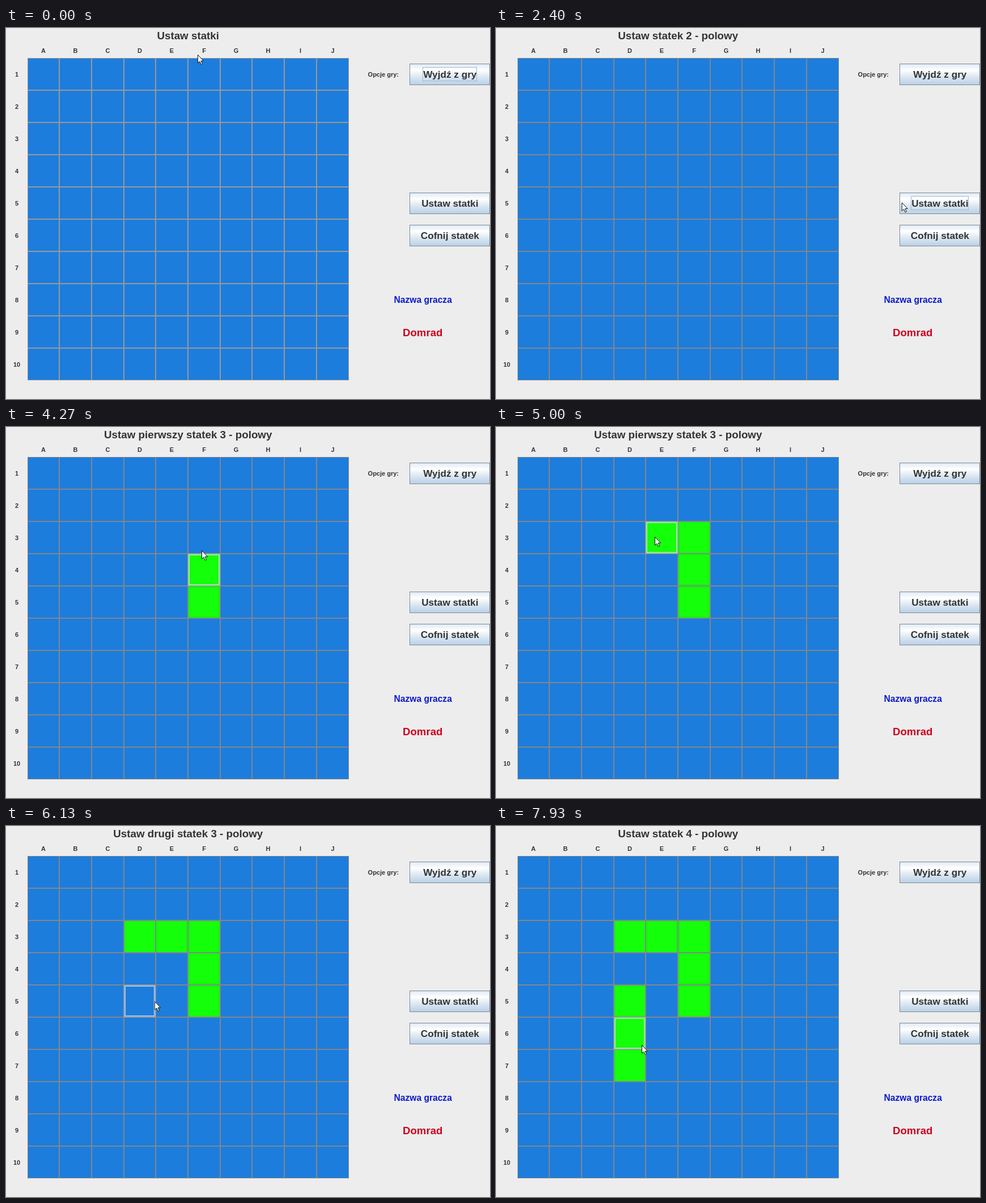
An HTML page with a canvas for the animation above (8000 ms loop, 854 by 656 pixels).

```html
<!DOCTYPE html>
<html lang="pl">
<head>
<meta charset="utf-8">
<title>Ustaw statki</title>
<style>
  html, body { margin: 0; width: 100%; height: 100%; overflow: hidden; background: #ededed; }
  canvas { display: block; }
</style>
</head>
<body>
<canvas id="stage" width="854" height="656"></canvas>
<script>
const ctx = document.getElementById('stage').getContext('2d');
const LOOP = 8000, FPS = 15, SHADE_TIME = 130;
const COLUMNS = 'ABCDEFGHIJ';
const INK = '#333', PRESSED = '#b8cfe5';
const edgeX = i => Math.round(37.8 + i * 56.67);
const edgeY = i => Math.round(53.4 + i * 56.92);

// Pointer stops: time and position of the tip
const stops = [
  [0, 338, 47], [870, 563, 33], [1530, 662, 176], [1800, 792, 300], [2130, 793, 308],
  [3130, 362, 310], [3400, 373, 303], [3900, 350, 248], [4530, 342, 200], [5000, 280, 194],
  [5400, 227, 207], [6130, 262, 310], [6870, 234, 375], [7270, 234, 412], [LOOP - 70, 257, 387]
];

// Mouse clicks: what is clicked, press and release time
const clicks = [
  ['place', 1800, 2130], ['F5', 3200, 3270], ['F4', 3670, 3870], ['F3', 4400, 4530],
  ['E3', 4800, 4870], ['D3', 5330, 5530], ['D5', 6000, 6400], ['D6', 6800, 7000],
  ['D7', 7130, 7470], ['D6', 7870, 7930]
];

function titleFor(started, fields) {
  if (!started) return 'Ustaw statki';
  if (fields < 2) return 'Ustaw statek 2 - polowy';
  if (fields < 5) return 'Ustaw pierwszy statek 3 - polowy';
  if (fields < 8) return 'Ustaw drugi statek 3 - polowy';
  return 'Ustaw statek 4 - polowy';
}

function stateAt(t) {
  const [focus, press, release] = clicks.filter(c => c[1] <= t).pop() || ['exit', -LOOP, -LOOP];
  const done = new Set(clicks.filter(c => c[2] <= t).map(c => c[0]));
  const started = done.delete('place');
  const pressed = t < Math.min(release, press + SHADE_TIME) ? focus : '';
  return { focus, pressed, done, started, title: titleFor(started, done.size) };
}

function pointerAt(t) {
  const next = stops.findIndex(s => s[0] > t);
  if (next < 0) return stops[stops.length - 1].slice(1);
  const [t0, x0, y0] = stops[next - 1], [t1, x1, y1] = stops[next];
  const k = (t - t0) / (t1 - t0), eased = k * k * (3 - 2 * k);
  return [x0 + (x1 - x0) * eased, y0 + (y1 - y0) * eased];
}

function rect(x, y, w, h, color) {
  ctx.fillStyle = color;
  ctx.fillRect(x, y, w, h);
}

// One-pixel frame just inside the given box
function frame(x, y, w, h, color) {
  ctx.strokeStyle = color;
  ctx.lineWidth = 1;
  ctx.strokeRect(x + 0.5, y + 0.5, w - 1, h - 1);
}

function text(str, x, baseline, size, color = INK) {
  ctx.font = `bold ${size}px "Liberation Sans", Arial, sans-serif`;
  ctx.textAlign = 'center';
  ctx.fillStyle = color;
  ctx.fillText(str, x, baseline);
}

function drawCell(col, row, state) {
  const name = COLUMNS[col] + (row + 1);
  const x = edgeX(col), y = edgeY(row);
  const w = edgeX(col + 1) - x, h = edgeY(row + 1) - y;
  const pressed = state.pressed === name;
  const color = pressed ? PRESSED : state.done.has(name) ? '#14ff0a' : '#1d7ddc';
  rect(x + 1, y + 1, w - 2, h - 2, color);
  if (state.focus === name && !pressed) {
    ['#b4b4b8', 'rgba(255,255,255,.3)', '#d0d0da']
      .forEach((ring, i) => frame(x + i, y + i, w - 2 * i, h - 2 * i, ring));
  }
}

function drawBoard(state) {
  rect(edgeX(0), edgeY(0), edgeX(10) - edgeX(0), edgeY(10) - edgeY(0),
    state.started ? '#82868a' : '#999');
  for (let i = 0; i < 10; i++) {
    text(COLUMNS[i], (edgeX(i) + edgeX(i + 1)) / 2, 43.8, 11);
    text(i + 1, 19, (edgeY(i) + edgeY(i + 1)) / 2 + 4.3, 11);
    for (let j = 0; j < 10; j++) drawCell(i, j, state);
  }
}

function drawButton(id, label, y, state) {
  const shade = ctx.createLinearGradient(0, y, 0, y + 38);
  ['#dde8f3', '#fff', '#dde8f3', PRESSED]
    .forEach((color, i) => shade.addColorStop(Math.min(i * 0.3 + (i > 2 ? 0.1 : 0), 1), color));
  rect(712, y, 142, 38, state.pressed === id ? PRESSED : shade);
  frame(712, y, 142, 38, '#7a8a99');
  text(label, 783.3, y + 25.4, 17.2);
  if (state.focus === id) {
    const w = Math.round(ctx.measureText(label).width) + 2;
    frame(Math.round(783 - w / 2), y + 6, w, 25, '#a3b8cc');
  }
}

function drawPointer([x, y]) {
  ctx.save();
  ctx.translate(x + 0.5, y + 0.5);
  const arrow = new Path2D('M0 0V14.5L3.3 11.5 5.8 17 8 16 5.6 10.6H10Z');
  ctx.fillStyle = '#fff';
  ctx.fill(arrow);
  ctx.strokeStyle = '#111';
  ctx.lineWidth = 1;
  ctx.stroke(arrow);
  ctx.restore();
}

function draw(t) {
  const state = stateAt(t);
  rect(0, 0, 854, 656, '#ededed');
  text(state.title, 321.2, 19.8, 18.8);
  drawBoard(state);
  text('Opcje gry:', 665.8, 86.3, 11);
  drawButton('exit', 'Wyjdź z gry', 63, state);
  drawButton('place', 'Ustaw statki', 291, state);
  drawButton('undo', 'Cofnij statek', 348, state);
  text('Nazwa gracza', 735.7, 486.3, 15.6, '#0a18d0');
  text('Domrad', 735.2, 544.8, 18.6, '#cc001e');
  drawPointer(pointerAt(t));
}

// The picture advances in even steps
function tick() {
  const step = Math.floor((performance.now() % LOOP + 4) * FPS / 1000);
  draw(Math.min(step * 1000 / FPS, LOOP - 1));
  requestAnimationFrame(tick);
}
tick();
</script>
</body>
</html>
```
